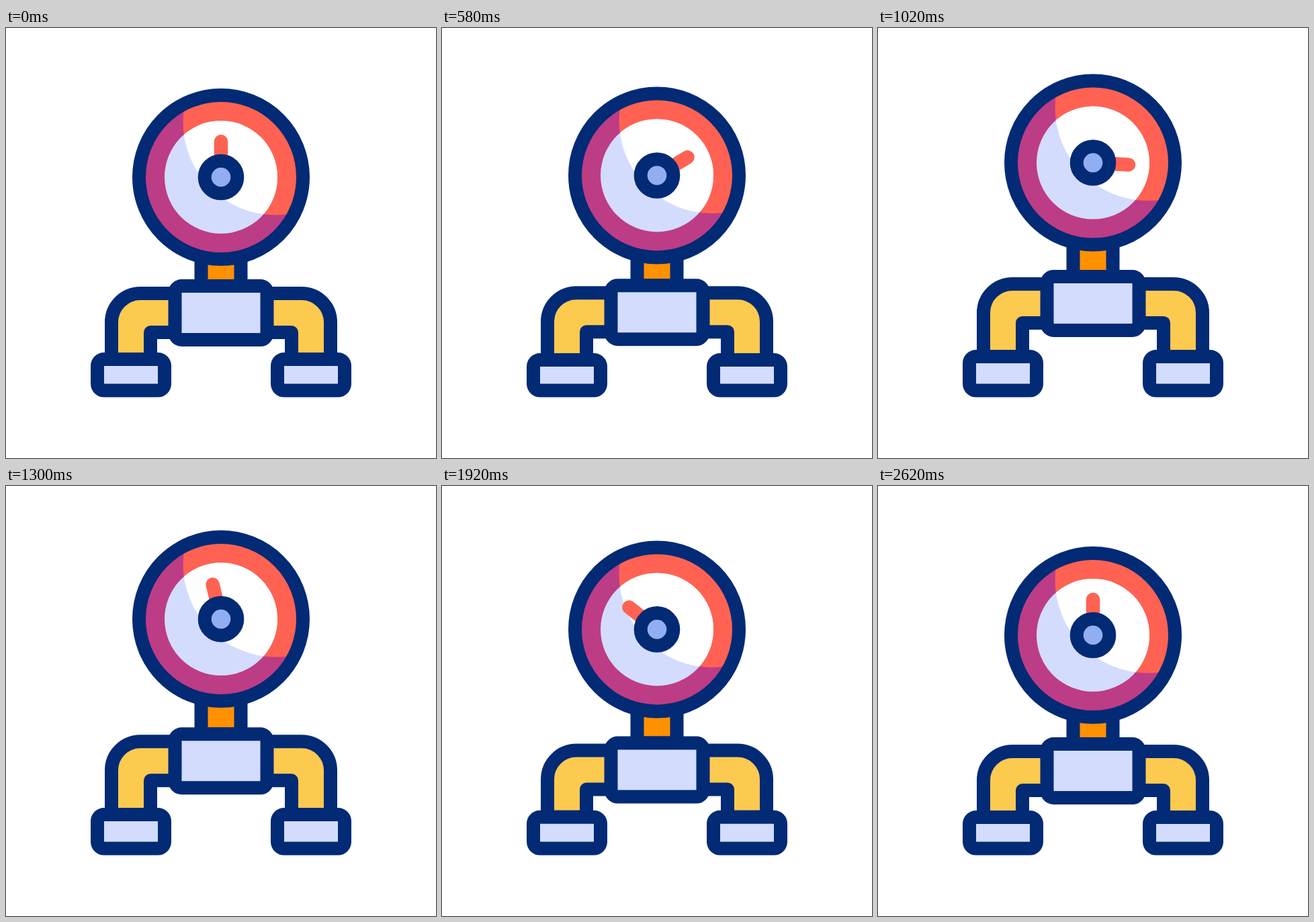
An HTML page for the animation above (2800 ms loop, 640 by 640 pixels).

```html
<!DOCTYPE html>
<html lang="en">
<head>
<meta charset="utf-8">
<title>Pressure gauge</title>
<style>
  html, body { margin: 0; width: 100%; height: 100%; overflow: hidden; background: #fff; }
  svg { display: block; width: 100%; height: 100%; }
  .line { stroke: #022a75; stroke-width: 20; stroke-linejoin: round; }
  .pale { fill: #d3dcfd; }
</style>
</head>
<body>
<svg viewBox="0 0 640 640">
  <defs>
    <clipPath id="lit"><circle cx="82" cy="-82" r="138.5"/></clipPath>
    <g id="side">
      <path class="line pipe" fill="#fdca50"/>
      <rect class="line pale foot" x="136" width="100" rx="10"/>
    </g>
  </defs>
  <rect id="neck" class="line" x="290.5" width="59" fill="#ff9100"/>
  <use href="#side"/>
  <use href="#side" transform="matrix(-1 0 0 1 640 0)"/>
  <rect id="box" class="line pale" x="251.5" width="137" height="80" rx="10"/>
  <g id="gauge">
    <circle r="122" fill="#bd3c86"/>
    <circle r="122" fill="#ff6252" clip-path="url(#lit)"/>
    <circle r="84" class="pale"/>
    <circle r="84" fill="#fff" clip-path="url(#lit)"/>
    <circle r="122" fill="none" class="line"/>
    <path id="needle" d="M0 0V-53" stroke="#ff6252" stroke-width="20.5" stroke-linecap="round"/>
    <circle r="24.3" fill="#91aef2" class="line"/>
  </g>
</svg>
<script>
const LOOP = 2800;
const find = selector => document.querySelector(selector);
const neck = find('#neck'), box = find('#box'), gauge = find('#gauge');
const needle = find('#needle'), pipe = find('.pipe'), foot = find('.foot');

// Sine ease from 0 to 1 between two times
function ease(time, start, end) {
  const u = Math.min(Math.max((time - start) / (end - start), 0), 1);
  return (1 - Math.cos(Math.PI * u)) / 2;
}

function draw(time) {
  const during = (start, end) => ease(time, start, end);
  const sink = during(220, 430), leap = during(430, 930), hang = during(930, 1290);
  const drop = during(1290, 1570), rebound = during(1570, 1840), settle = during(1840, 2290);

  // In each line the weights add up to zero, so every part returns to rest
  const gaugeY = 222 + 2.3 * sink - 23.3 * leap - 3 * hang + 27 * drop - 12.3 * rebound + 9.3 * settle;
  const body = 2.6 * sink - 16.6 * leap - .8 * hang + 9.8 * drop + 3.5 * rebound + 1.5 * settle;
  const footY = 493 + 2.3 * sink - 6.3 * leap + 3 * drop + .6 * rebound + .4 * settle;
  const turn = 108 * during(220, 900) - 177 * during(900, 1545) + 69 * during(1683, 2393);

  gauge.setAttribute('transform', `translate(320 ${gaugeY})`);
  needle.setAttribute('transform', `rotate(${turn})`);
  neck.setAttribute('y', gaugeY);
  neck.setAttribute('height', 384 + body - gaugeY);
  box.setAttribute('y', 384 + body);
  foot.setAttribute('y', footY);
  foot.setAttribute('height', 539.5 - footY);
  pipe.setAttribute('d', `M252 ${395 + body}H200a43 43 0 0 0-43 43V${footY}H215V${453 + body}H252Z`);
}

function tick() {
  draw(performance.now() % LOOP);
  requestAnimationFrame(tick);
}
tick();
</script>
</body>
</html>
```
